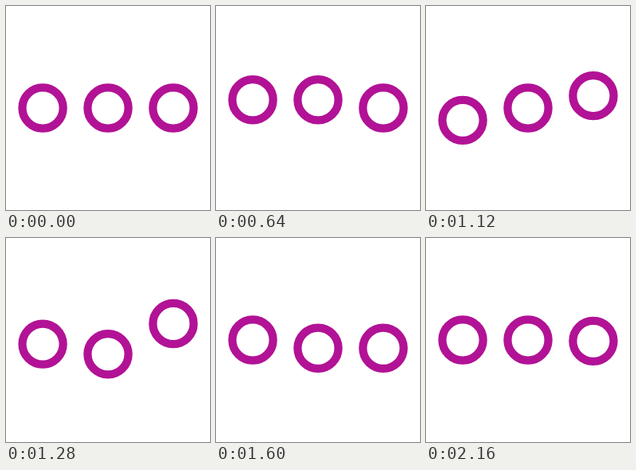
Animation of 256 by 256 pixels, one loop 2240 ms. Source, as an HTML page:

```html
<!DOCTYPE html>
<html>
<head>
<meta charset="utf-8">
<title>Bouncing rings</title>
<style>
  html, body { margin: 0; width: 100%; height: 100%; overflow: hidden; background: #fff; }
  svg { display: block; width: 100%; height: 100%; }
  circle { fill: none; stroke: #b21295; stroke-width: 4; }
</style>
</head>
<body>
<svg viewBox="0 0 100 100">
  <circle cx="18" cy="50" r="10"/>
  <circle cx="50" cy="50" r="10"/>
  <circle cx="82" cy="50" r="10"/>
</svg>
<script>
  const LOOP = 2240, STEP = 80, DELAY = 400, SEGMENT = 480;
  const stops = [50, 42, 58, 50];
  const rings = document.querySelectorAll('circle');
  const easeInOutSine = p => (1 - Math.cos(Math.PI * p)) / 2;

  // Rest, rise, dip, then return to rest.
  function height(t) {
    const s = Math.max(0, Math.min(3, t / SEGMENT));
    const i = Math.min(2, Math.floor(s));
    return stops[i] + (stops[i + 1] - stops[i]) * easeInOutSine(s - i);
  }

  function draw(now) {
    const t = Math.floor(now % LOOP / STEP) * STEP;
    rings.forEach((ring, i) => ring.setAttribute('cy', height(t - i * DELAY)));
    requestAnimationFrame(draw);
  }
  requestAnimationFrame(draw);
</script>
</body>
</html>
```
